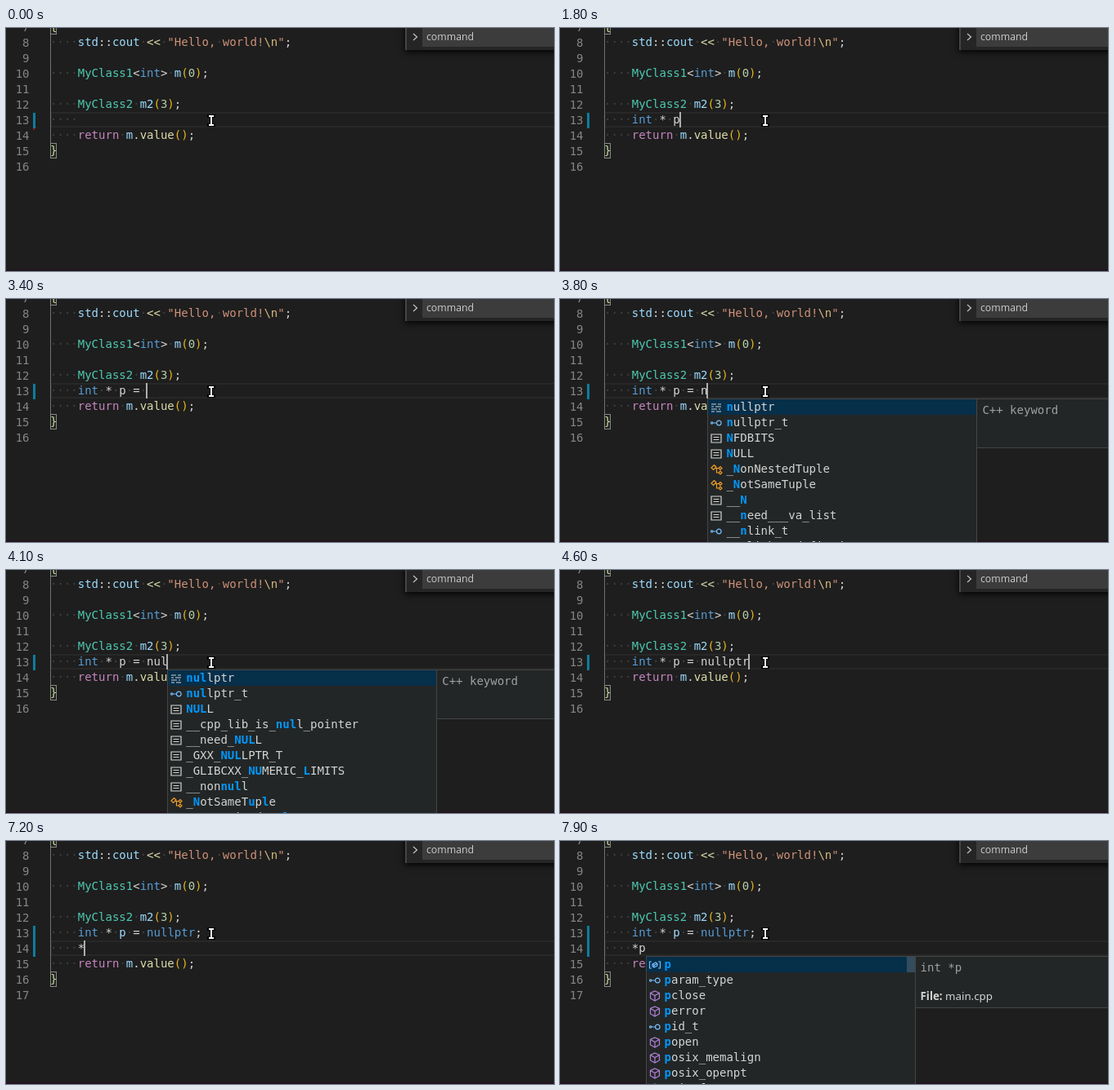
Recreate the animation shown at these times as an HTML page. Size 670 by 298 pixels, loop 8 s.

```html
<!DOCTYPE html>
<html lang="en">
<head>
<meta charset="utf-8">
<title>Editor autocompletion</title>
<style>
html, body { margin: 0; width: 100%; height: 100%; overflow: hidden; background: #1e1e1e; }
#stage { position: relative; width: 670px; height: 298px; overflow: hidden; background: #1e1e1e;
  color: #d4d4d4; font: 14px/19px "DejaVu Sans Mono", monospace; }
#stage div, #stage svg { position: absolute; white-space: pre; }
kw { color: #569cd6; } ty { color: #4ec9b0; } va { color: #9cdcfe; } st { color: #ce9178; }
es { color: #d7ba7d; } nu { color: #b5cea8; } fn { color: #dcdcaa; } ct { color: #c586c0; }
pa { color: #e6b422; } bc { color: #d4d4aa; } ws { color: #404040; }
.num { left: 0; width: 28.5px; margin-top: 1px; text-align: right; color: #858585; }
.code { left: 54px; }
.current { left: 54px; width: 640px; height: 15px; border: 2px solid #282828; }
.guide { left: 54px; top: 8px; width: 1px; background: #707070; }
.match { left: 54px; width: 6px; height: 17px; border: 1px solid #888; background: rgba(0,100,0,.1); }
.changed { left: 33px; top: 104px; width: 3px; background: #0c7d9d; }
.removed { left: 33px; top: 118px; border: 4px solid transparent; border-left-color: #94151b; border-right: 0; }
.caret { width: 2px; height: 19px; background: #aeafad; }
.edge { left: 0; top: 296px; width: 670px; height: 2px; background: #21141d; }
.list, .info { background: #232626; border: 1px solid #454545; box-sizing: border-box; }
.list { width: 330px; height: 240px; }
.item { left: 0; width: 328px; height: 19px; }
.item.on { background: #062f4a; }
.item span { position: absolute; left: 22px; }
.item b { color: #0097fb; }
.item svg { left: 2px; top: 1.5px; }
.thumb { right: 0; top: 0; width: 10px; height: 19px; background: rgba(121,121,121,.4); }
.info { width: 400px; }
.sign { left: 6px; top: 4px; opacity: .7; }
.file { left: 6px; top: 39px; font: 13.3px/19px "Noto Sans", sans-serif; }
.find { left: 488px; top: -8px; width: 200px; height: 35px; background: #252526; box-shadow: 0 2px 8px #000; }
.sash { left: 0; top: 0; width: 2px; height: 35px; background: #454545; }
.field { left: 21px; top: 0; width: 180px; height: 31px; background: #3c3c3c; }
.field span { position: absolute; left: 5px; top: 9px; color: #ccc; font: 12.3px/19px "Open Sans", sans-serif; }
</style>
</head>
<body>
<div id="stage">
  <div id="editor"></div>
  <div class="edge"></div>
  <div class="find">
    <div class="sash"></div>
    <svg style="left:7px;top:13px" width="12" height="12" fill="none" stroke="#c5c5c5" stroke-width="1.2"><path d="M3 2l4.5 4L3 10"/></svg>
    <div class="field"><span>command</span></div>
  </div>
  <div id="popup"></div>
  <svg style="left:245px;top:105px" width="12" height="18" fill="none">
    <defs><path id="beam" d="M3 3H9M6 3V14M3 14H9"/></defs>
    <use href="#beam" stroke="#000" stroke-width="4" stroke-linecap="square"/>
    <use href="#beam" stroke="#fff" stroke-width="2"/>
  </svg>
</div>
<script>
const LOOP = 8000, ROW = 19, CHAR = 8.428, CODE_X = 54 + 4 * CHAR;
const lineTop = n => 103 + (n - 13) * ROW;

const before = [
  '<bc>{</bc>',
  '    <va>std</va>::<va>cout</va> <fn>&lt;&lt;</fn> <st>"Hello, world!<es>\\n</es>"</st>;',
  '',
  '    <ty>MyClass1</ty>&lt;<kw>int</kw>&gt; <va>m</va><pa>(</pa><nu>0</nu><pa>)</pa>;',
  '',
  '    <ty>MyClass2</ty> <va>m2</va><pa>(</pa><nu>3</nu><pa>)</pa>;'
];
const after = ['    <ct>return</ct> <va>m</va>.<fn>value</fn><pa>()</pa>;', '<bc>}</bc>', ''];

const icons = {
  keyword: ['#d4d4d4', 'M2 4H8M10 4H14M2 7H5M7 7H14M2 10H9M11 10H13M2 13H6M8 13H14'],
  type: ['#75beff', 'M1.5 8a1.2 1.2 0 1 0 2.4 0a1.2 1.2 0 1 0-2.4 0M4 8H8.5M8.5 8a2.8 2.8 0 1 0 5.6 0a2.8 2.8 0 1 0-5.6 0'],
  constant: ['#d4d4d4', 'M2 3H14V13H2ZM4.5 6.5H11.5M4.5 9.5H11.5'],
  class: ['#ee9d28', 'M2 6L5.5 2.5L8 5L4.5 8.5ZM7 6.5H11M8.5 6.5V12H11M11 6.5L13 4.5L15 6.5L13 8.5ZM11 12L13 10L15 12L13 14Z'],
  method: ['#b180d7', 'M8 2L13.5 4.5V11L8 14L2.5 11V4.5ZM2.5 4.5L8 7.5L13.5 4.5M8 7.5V14'],
  variable: ['#75beff', 'M4 4H1.5V12H4M12 4H14.5V12H12M5 7L9 5L11 6.5V9L7 11L5 9.5ZM5 7L7 8.3L11 6.5M7 8.3V11']
};

// Each entry is "icon label".
const nItems = ['keyword nullptr', 'type nullptr_t', 'constant NFDBITS', 'constant NULL', 'class _NonNestedTuple',
  'class _NotSameTuple', 'constant __N', 'constant __need___va_list', 'type __nlink_t', 'constant __nlink_t_defined'];
const nulItems = ['keyword nullptr', 'type nullptr_t', 'constant NULL', 'constant __cpp_lib_is_null_pointer',
  'constant __need_NULL', 'constant _GXX_NULLPTR_T', 'constant _GLIBCXX_NUMERIC_LIMITS', 'constant __nonnull',
  'class _NotSameTuple', 'class _NotDerivedTuple'];
const pItems = ['type param_type', 'method pclose', 'method perror', 'type pid_t', 'method popen',
  'method posix_memalign', 'method posix_openpt', 'method printf', 'method putchar'];

const keywordInfo = { sign: 'C++ keyword', height: 61 };
const pPopup = { query: 'p', items: ['variable p', ...pItems], thumb: true };
const done = '<kw>int</kw> * p = <kw>nullptr</kw>;';
const final = done.replace('* p', '* <va>p</va>');

// Each step overrides part of the state left by the one before it.
const steps = [
  [0, { first: '', second: null, caret: false, removed: true, bars: 1, popup: null }],
  [400, { caret: true }],
  [700, { first: 'i' }],
  [900, { first: '<kw>int</kw>' }],
  [1100, { first: '<kw>int</kw> ' }],
  [1300, { removed: false }],
  [1500, { first: '<kw>int</kw> *' }],
  [1700, { first: '<kw>int</kw> * ' }],
  [1800, { first: '<kw>int</kw> * p' }],
  [1900, { popup: { query: 'p', items: pItems, thumb: true, info: { sign: 'using param_type', height: 61 } } }],
  [2100, { first: '<kw>int</kw> * p ', popup: null }],
  [2400, { first: '<kw>int</kw> * p =' }],
  [2500, { first: '<kw>int</kw> * p = ' }],
  [2900, { caret: false }],
  [3400, { caret: true }],
  [3800, { first: '<kw>int</kw> * p = n', popup: { query: 'n', items: nItems, info: keywordInfo } }],
  [3900, { first: '<kw>int</kw> * p = nu', popup: { query: 'nu', items: nulItems, info: keywordInfo } }],
  [4100, { first: '<kw>int</kw> * p = nul', popup: { query: 'nul', items: nulItems, info: keywordInfo } }],
  [4600, { first: '<kw>int</kw> * p = nullptr', popup: null }],
  [4800, { first: done.slice(0, -1) }],
  [5100, { first: done }],
  [5600, { second: '' }],
  [5800, { first: final }],
  [6100, { caret: false }],
  [6700, { caret: true }],
  [7100, { second: '*' }],
  [7200, { bars: 2 }],
  [7400, { second: '*p' }],
  [7600, { popup: pPopup }],
  [7700, { popup: { ...pPopup, info: { sign: 'int *p', file: 'main.cpp', height: 64 } } }],
  [7900, { caret: false }]
];
const states = [];
for (const [at, change] of steps) states.push({ ...states[states.length - 1], ...change, at });

const div = (cls, style, content = '') => `<div class="${cls}" style="${style}">${content}</div>`;
const dotted = html => html.replace(/ /g, '<ws>·</ws>');
const columns = html => html.replace(/<[^>]+>/g, '').length;

function activeLine({ first, second }) {
  const typed = second === null ? first : second;
  return { top: lineTop(second === null ? 13 : 14), x: CODE_X + columns(typed) * CHAR };
}

function editorHtml(s) {
  const typed = s.second === null ? [s.first] : [s.first, s.second];
  const lines = [...before, ...typed.map(t => '    ' + t), ...after];
  const closing = 7 + lines.length - 2;
  const { top, x } = activeLine(s);
  let html = div('current', `top:${top}px`);
  html += div('guide', `height:${lineTop(closing) - 8}px`);
  for (const n of [7, closing]) html += div('match', `top:${lineTop(n)}px`);
  lines.forEach((line, i) => {
    const style = `top:${lineTop(7 + i)}px`;
    html += div('num', style, 7 + i) + div('code', style, dotted(line));
  });
  if (s.removed) html += div('removed', '');
  html += div('changed', `height:${s.bars * ROW}px`);
  if (s.caret) html += div('caret', `left:${Math.floor(x - 0.5)}px;top:${top}px`);
  return html;
}

// Marks a contiguous match, or else the letters of the query in order.
function highlight(label, query) {
  const lower = label.toLowerCase(), at = lower.indexOf(query);
  if (at >= 0) {
    const end = at + query.length;
    return `${label.slice(0, at)}<b>${label.slice(at, end)}</b>${label.slice(end)}`;
  }
  let k = 0;
  return [...label].map((c, i) => lower[i] === query[k] ? (k++, `<b>${c}</b>`) : c).join('');
}

function iconSvg(name) {
  const [color, path] = icons[name];
  return `<svg width="16" height="16" fill="none" stroke="${color}" stroke-width="1.2"><path d="${path}"/></svg>`;
}

function popupHtml(s) {
  if (!s.popup) return '';
  const { query, items, info, thumb } = s.popup;
  const { top, x } = activeLine(s);
  const y = top + ROW;
  const rows = items.map((item, i) => {
    const [icon, label] = item.split(' ');
    return div(i ? 'item' : 'item on', `top:${i * ROW}px`, `${iconSvg(icon)}<span>${highlight(label, query)}</span>`);
  }).join('');
  let html = div('list', `left:${x}px;top:${y}px`, rows + (thumb ? div('thumb', '') : ''));
  if (info) {
    const file = info.file ? div('file', '', `<b>File:</b> ${info.file}`) : '';
    html += div('info', `left:${x + 329}px;top:${y}px;height:${info.height}px`, div('sign', '', info.sign) + file);
  }
  return html;
}

const editor = document.getElementById('editor');
const popup = document.getElementById('popup');
let shown = null;

function show(time) {
  const state = states.filter(s => s.at <= time).pop();
  if (state === shown) return;
  shown = state;
  editor.innerHTML = editorHtml(state);
  popup.innerHTML = popupHtml(state);
}

const start = performance.now();
function tick() {
  show((performance.now() - start) % LOOP);
  requestAnimationFrame(tick);
}
tick();
</script>
</body>
</html>
```
